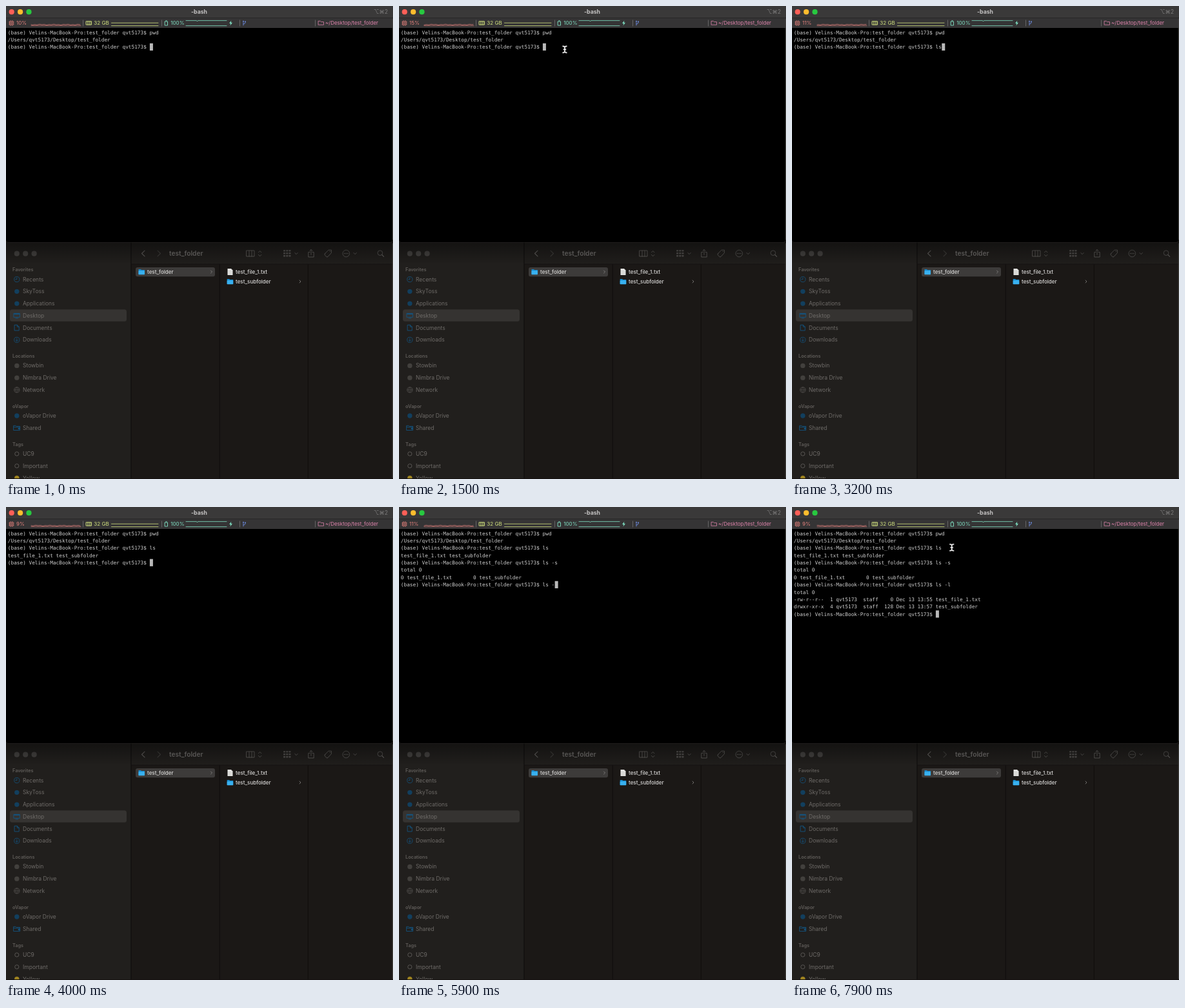
An HTML page that plays this animation: 600 px wide and 733 px high, repeating every 8 s.

```html
<!DOCTYPE html>
<html lang="en">
<head>
<meta charset="utf-8">
<title>Terminal and file browser</title>
<style>
  html, body { margin: 0; width: 100%; height: 100%; overflow: hidden; background: #1b1917; }
  svg { display: block; width: 100vw; height: 100vh; font-family: Inter, Roboto, sans-serif; }
  .mono { font: 7.78px "DejaVu Sans Mono", monospace; fill: #cfcfcf; white-space: pre; }
  .line { fill: none; stroke-linecap: round; stroke-linejoin: round; }
</style>
</head>
<body>
<svg id="stage" viewBox="0 0 600 733" preserveAspectRatio="none">
  <defs>
    <linearGradient id="shade" x2="0" y2="1">
      <stop offset="0" stop-opacity="0.4"/>
      <stop offset="1" stop-opacity="0"/>
    </linearGradient>
  </defs>
</svg>
<script>
const NS = "http://www.w3.org/2000/svg";
const stage = document.getElementById("stage");
const LOOP = 8000;

function add(tag, attrs, text) {
  const el = document.createElementNS(NS, tag);
  for (const key in attrs) el.setAttribute(key, attrs[key]);
  if (text !== undefined) el.textContent = text;
  return stage.appendChild(el);
}
const rect = (x, y, width, height, fill, rx = 0) => add("rect", { x, y, width, height, fill, rx });
const dot = (cx, cy, r, fill, stroke = "none") => add("circle", { cx, cy, r, fill, stroke, "stroke-width": 0.8 });
const line = (d, stroke, width = 0.9) => add("path", { d, stroke, "stroke-width": width, class: "line" });
const label = (x, y, size, fill, text, weight = 400) =>
  add("text", { x, y, fill, "font-size": size, "font-weight": weight }, text);

// Terminal window
rect(0, 0, 600, 733, "#1b1917");
rect(0, 0, 600, 19, "#3a3939");
rect(0, 18.5, 600, 15.5, "#353435");
rect(0, 18, 600, 0.8, "#242424");
["#fe5f57", "#febc2e", "#28c840"].forEach((fill, i) => dot(8.7 + i * 13.4, 9.2, 4.1, fill));
label(299.5, 12.3, 8.7, "#c4c3c3", "-bash", 700).setAttribute("text-anchor", "middle");
label(570, 11.8, 8.4, "#7d7c7c", "⌥⌘2");
add("path", { d: "M0 34H599V362Q599 366 595 366H4Q0 366 0 362Z", fill: "#000" });
line("M599.3 20V362", "#4b4947", 0.9);

// Status bar
const RED = "#e2807c", LIME = "#cfdf7d", MINT = "#7fe0c3", BLUE = "#6f8fe8", PINK = "#dc82aa";
[119.5, 241.5, 362.5, 479.5].forEach(x => line(`M${x} 22V31`, "#737273", 0.8));
line("M5.8 23.8H11.2V29.2H5.8ZM7.3 25.3H9.7V27.7H7.3ZM7 22.8V23.5M10 22.8V23.5M7 29.5V30.2M10 29.5V30.2M4.8 25H5.4M4.8 28H5.4M11.6 25H12.2M11.6 28H12.2", RED, 0.8);
const cpuText = label(16, 29.4, 8, RED, "");
const cpuGraph = line("", RED, 0.8);
line("M39 30.6H116", RED, 0.6);
line("M124.5 23.8H132.5V29H124.5ZM127 24V29M130 24V29", LIME, 1);
label(136.3, 29.4, 8.1, LIME, "32 GB");
line("M163.5 26.2H236M163.5 30.6H236", LIME, 0.8);
line("M246.5 24H250.5V30H246.5ZM247.7 22.8H249.3", MINT, 0.9);
label(255.3, 29.4, 8, MINT, "100%");
line("M279 22.6H295.5L296.5 24L297.5 22.6H342M279 30.6H342", MINT, 0.8);
add("path", { d: "M349.3 22.5L346 27H348.2L347.4 30.6L351 25.7H348.7Z", fill: MINT });
line("M368 24V30M371 25V26Q371 27.5 368 28", BLUE, 0.8);
dot(368, 23.6, 0.9, BLUE);
dot(371, 24.2, 0.9, BLUE);
line("M484.5 23.4H487.5L488.7 24.6H492.5V29.2H484.5Z", PINK, 0.8);
label(495, 29.4, 8, PINK, "~/Desktop/test_folder");

// File browser window
rect(0, 367, 193.5, 365, "#211f1d");
rect(194, 367, 405, 365, "#1b1816");
rect(194, 367, 405, 33, "#201e1c");
line("M3 366.7H597", "#343231", 0.7);
line("M194 367V732", "#0e0d0c", 1);
line("M194.5 400H599", "#131110", 0.8);
line("M331.2 401V732M468.3 401V732", "#0f0d0c", 1);
line("M599.3 368V731", "#4b4947", 0.9);
[16.8, 30.2, 43.6].forEach(x => dot(x, 383.7, 4.1, "#444240"));

const TOOL = "#5f5d5b";
line("M215 379.2L210.5 383.5L215 387.8", TOOL, 1.1);
line("M235 379.2L239.5 383.5L235 387.8", "#3f3d3b", 1.1);
label(253, 387, 10.2, "#6d6b69", "test_folder", 600);
line("M373 379H385V388H373ZM377 379V388M381 379V388", TOOL, 0.9);
line("M391.5 381.8L393.7 379.5L395.9 381.8M391.5 385.5L393.7 387.8L395.9 385.5", TOOL, 0.9);
for (let row = 0; row < 3; row++)
  for (let col = 0; col < 3; col++) rect(430 + col * 4.2, 378 + row * 4, 3.1, 2.5, "#504e4c", 0.4);
line("M447.8 382.5L450 384.7L452.2 382.5M539 382.5L541.2 384.7L543.4 382.5", TOOL, 0.9);
line("M471 381.5H468.8V389H477.2V381.5H475M473 385.5V377.5M470.8 379.5L473 377.3L475.2 379.5", TOOL, 0.9);
line("M494.5 383.7L500 378.2H504.5V382.5L499 388.5Q497.8 389.4 496.7 388.3L494.3 386Q493.5 385 494.5 383.7Z", TOOL, 0.9);
dot(502.4, 380.4, 0.6, TOOL);
dot(527.3, 383.5, 5.3, "none", TOOL);
[524.8, 527.3, 529.8].forEach(x => dot(x, 383.5, 0.8, TOOL));
dot(580, 382.7, 3.8, "none", TOOL);
line("M582.8 385.5L585.7 388.3", TOOL, 1.1);
rect(0, 366.4, 599, 34, "url(#shade)");

// Sidebar
const ACCENT = "#14547f", MUTED = "#54514f";
const clock = y => { dot(16.8, y, 4.1, "none", ACCENT); line(`M16.8 ${y - 2.5}V${y}H14.8`, ACCENT, 0.8); };
const disc = color => y => dot(16.8, y, 3.7, color);
const mark = disc("#123f5e");
const greyMark = disc("#42403d");
const ring = y => dot(16.8, y, 3.1, "none", "#656260");
const desktop = y => {
  line(`M12.3 ${y - 3.5}H21.3V${y + 2.5}H12.3ZM15 ${y + 4}H18.6`, ACCENT);
  rect(12.3, y - 3.5, 9, 1.7, ACCENT);
};
const page = y => line(`M13.5 ${y - 4.3}H17.3L20.2 ${y - 1.4}V${y + 4.3}H13.5ZM17.3 ${y - 4.3}V${y - 1.4}H20.2`, ACCENT);
const download = y => {
  dot(16.8, y, 4.1, "none", ACCENT);
  line(`M16.8 ${y - 2.2}V${y + 2}M15 ${y + 0.4}L16.8 ${y + 2.2}L18.6 ${y + 0.4}`, ACCENT, 0.8);
};
const globe = y => {
  dot(16.8, y, 4.1, "none", MUTED);
  line(`M12.7 ${y}H20.9M16.8 ${y - 4.1}Q13 ${y} 16.8 ${y + 4.1}Q20.6 ${y} 16.8 ${y - 4.1}`, MUTED, 0.7);
};
const shared = y => {
  line(`M12 ${y - 3.4}H15L16 ${y - 2.4}H21.6V${y + 3.7}H12ZM12 ${y - 1}H21.6`, ACCENT);
  dot(20, y + 1.2, 1.4, ACCENT);
};

rect(6, 470.2, 181, 18.6, "#353331", 3.5);
const sections = [
  ["Favorites", 408.6, [["Recents", clock], ["SkyToss", mark], ["Applications", mark],
    ["Desktop", desktop], ["Documents", page], ["Downloads", download]]],
  ["Locations", 542.4, [["Stowbin", greyMark], ["Nimbra Drive", greyMark], ["Network", globe]]],
  ["oVapor", 620, [["oVapor Drive", mark], ["Shared", shared]]],
  ["Tags", 679, [["UC9", ring], ["Important", ring], ["Yellow", disc("#9f8420")]]]
];
for (const [title, top, items] of sections) {
  label(10, top + 2.7, 7.3, "#605d5a", title, 600);
  items.forEach(([name, icon], i) => {
    const y = top + 15 + i * 18.75;
    icon(y);
    label(26, y + 3, 8.5, "#6e6b68", name);
  });
}
rect(0, 732, 600, 1, "#161211");

// Columns
function folder(x, y) {
  add("path", { d: `M${x} ${y - 4}H${x + 3.5}L${x + 4.5} ${y - 3}H${x + 9.5}V${y + 4}H${x}Z`, fill: "#168bcf" });
  rect(x, y - 1.8, 9.5, 6, "#39b1f0", 0.8);
}
const arrow = (x, y) => line(`M${x} ${y - 2}L${x + 2} ${y}L${x} ${y + 2}`, "#8b8987", 0.8);
rect(201, 405, 123, 14.3, "#3d3b3a", 3);
folder(205.5, 412);
label(219, 414.8, 8, "#d9d8d7", "test_folder", 500);
arrow(317.5, 412);
add("path", { d: "M343.5 407H349L351.5 409.5V417H343.5Z", fill: "#e4e4e2" });
line("M345 411H350M345 413H350M345 415H350", "#b5b5b3", 0.5);
label(356, 414.8, 8.1, "#d9d8d7", "test_file_1.txt", 500);
folder(342.7, 427);
label(356, 429.8, 8, "#d9d8d7", "test_subfolder", 500);
arrow(455, 427);

// Shell session: keystroke times, enter time, output
const PROMPT = "(base) Velins-MacBook-Pro:test_folder qvt5173$ ";
const session = [
  { text: "pwd", keys: [0, 0, 0], enter: 0, out: ["/Users/qvt5173/Desktop/test_folder"] },
  { text: "ls", keys: [2900, 3100], enter: 3400, out: ["test_file_1.txt test_subfolder"] },
  { text: "ls -s", keys: [4400, 4500, 4700, 4800, 5000], enter: 5200,
    out: ["total 0", "0 test_file_1.txt       0 test_subfolder"] },
  { text: "ls -l", keys: [5500, 5600, 5700, 5900, 6100], enter: 6500,
    out: ["total 0", "-rw-r--r--  1 qvt5173  staff    0 Dec 13 13:55 test_file_1.txt",
      "drwxr-xr-x  4 qvt5173  staff  128 Dec 13 13:57 test_subfolder"] },
  { text: "", keys: [], enter: Infinity, out: [] }
];
const ADVANCE = 4.683, ROW = 11.38;
const caret = rect(0, 0, 5, 11.2, "#b9b9b9");
const rows = Array.from({ length: 12 }, (_, i) => add("text", { x: 2.8, y: 43.5 + i * ROW, class: "mono" }));

function screenAt(t) {
  const lines = [];
  for (const { text, keys, enter, out } of session) {
    lines.push(PROMPT + text.slice(0, keys.filter(k => k <= t).length));
    if (t < enter) break;
    lines.push(...out);
  }
  return lines;
}

const cpuLoad = [[0, 10], [500, 15], [2000, 11], [3500, 9], [4600, 12], [5600, 11], [7300, 9]];

function drawCpu(t) {
  const step = cpuLoad.filter(([start]) => start <= t).length - 1;
  cpuText.textContent = cpuLoad[step][1] + "%";
  let d = "";
  for (let i = 0; i <= 38; i++) {
    const n = i + step;
    const y = 28.9 + 0.35 * Math.sin(n * 1.7) + 0.3 * Math.sin(n * 0.63);
    d += `${i ? "L" : "M"}${39 + i * 2} ${y.toFixed(2)}`;
  }
  cpuGraph.setAttribute("d", d);
}

// Text pointer
const BEAM = "M-2.8 -5Q-0.5 -5 0 -3.5Q0.5 -5 2.8 -5M0 -3.5V3.5M-2.8 5Q-0.5 5 0 3.5Q0.5 5 2.8 5M-1.5 0H1.5";
const beam = [["#222", 3], ["#f4f4f4", 1.6]].map(([color, width]) => line(BEAM, color, width));

function drawPointer(t) {
  const visible = (t >= 700 && t < 2900) || t >= 7600;
  const p = Math.min(1, Math.max(0, (t - 600) / 1000));
  const e = t > 2900 ? 1 : p * p * (3 - 2 * p);
  const x = 584.7 - 337 * e, y = 228.4 - 165.6 * e;
  for (const part of beam) {
    part.setAttribute("visibility", visible ? "visible" : "hidden");
    part.setAttribute("transform", `translate(${x} ${y})`);
  }
}

function render(t) {
  const lines = screenAt(t);
  rows.forEach((row, i) => { row.textContent = lines[i] || ""; });
  const last = lines.length - 1;
  caret.setAttribute("x", 2.8 + lines[last].length * ADVANCE);
  caret.setAttribute("y", 35.1 + last * ROW);
  drawCpu(t);
  drawPointer(t);
}

const start = performance.now();
function tick(now) {
  render(Math.max(0, now - start) % LOOP);
  requestAnimationFrame(tick);
}
render(0);
requestAnimationFrame(tick);
</script>
</body>
</html>
```
